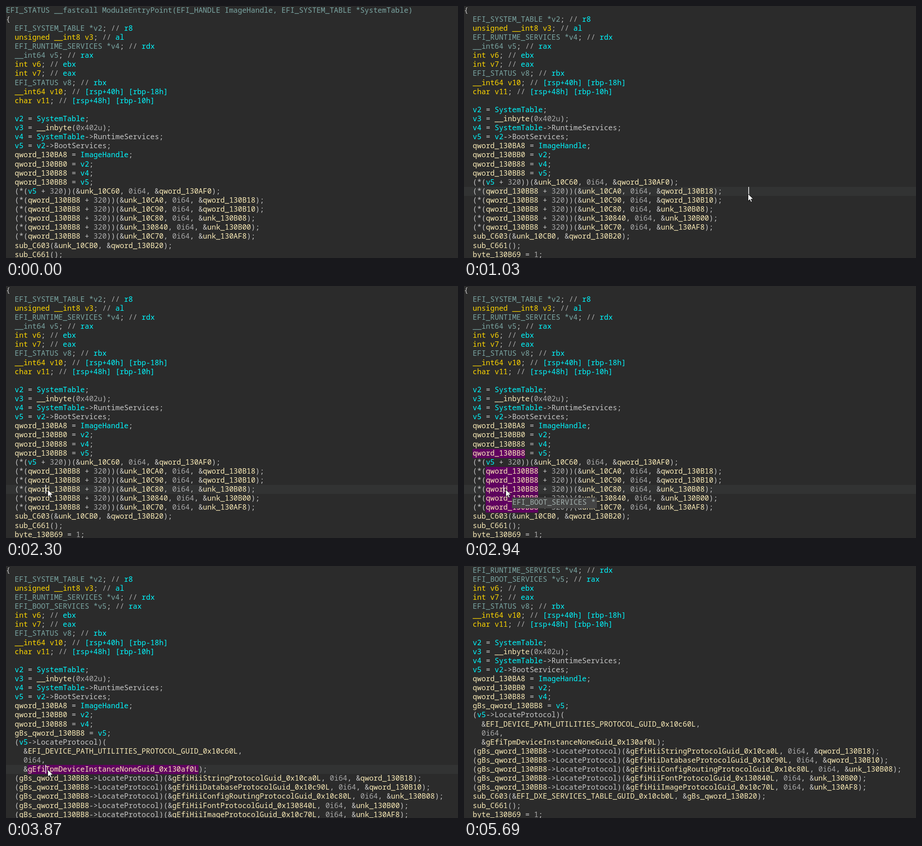
Animation, 1000 px wide and 560 px high, one loop 8.99 s. Source, as an HTML page with a canvas:

```html
<!DOCTYPE html>
<html>
<head>
<meta charset="utf-8">
<style>
html, body { margin: 0; width: 100%; height: 100%; overflow: hidden; background: #2b2b2b; }
canvas { display: block; }
</style>
</head>
<body>
<canvas id="stage" width="1000" height="560"></canvas>
<script>
const ctx = document.getElementById('stage').getContext('2d');
const LOOP = 8990, CW = 9.68, LH = 20.11, BASE = 14.7;
const FONT = '16.133px "Noto Sans Mono", "DejaVu Sans Mono", monospace';
const TYPE = '#7ba6a3', KEYWORD = '#ffd700', LOCAL = '#00f8ff', NAME = '#fbecb8',
      PUNCT = '#c6c6c6', DIM = '#a9a9a9';

const head = `EFI_STATUS __fastcall ModuleEntryPoint(EFI_HANDLE ImageHandle, EFI_SYSTEM_TABLE *SystemTable)
{
  EFI_SYSTEM_TABLE *v2; // r8
  unsigned __int8 v3; // al
  EFI_RUNTIME_SERVICES *v4; // rdx
  __int64 v5; // rax
  int v6; // ebx
  int v7; // eax
  EFI_STATUS v8; // rbx
  __int64 v10; // [rsp+40h] [rbp-18h]
  char v11; // [rsp+48h] [rbp-10h]

  v2 = SystemTable;
  v3 = __inbyte(0x402u);
  v4 = SystemTable->RuntimeServices;
  v5 = v2->BootServices;
  qword_130BA8 = ImageHandle;
  qword_130BB0 = v2;
  qword_130B88 = v4;
  qword_130BB8 = v5;
`;
const tail = `
  sub_C661();
  byte_130B69 = 1;`;

const call = (guid, out) => `  (*(qword_130BB8 + 320))(&${guid}, 0i64, &${out});`;
const namedCall = (guid, out) =>
  `  (gBs_qword_130BB8->LocateProtocol)(&gEfiHii${guid}L, 0i64, &${out});`;

const before = head + [
  '  (*(v5 + 320))(&unk_10C60, 0i64, &qword_130AF0);',
  call('unk_10CA0', 'qword_130B18'),
  call('unk_10C90', 'qword_130B10'),
  call('unk_10C80', 'unk_130B08'),
  call('unk_130840', 'unk_130B00'),
  call('unk_10C70', 'unk_130AF8'),
  '  sub_C603(&unk_10CB0, &qword_130B20);'
].join('\n') + tail;

const after = head
  .replace('__int64 v5', 'EFI_BOOT_SERVICES *v5')
  .replace('qword_130BB8', 'gBs_qword_130BB8') + [
  '  (v5->LocateProtocol)(',
  '    &EFI_DEVICE_PATH_UTILITIES_PROTOCOL_GUID_0x10c60L,',
  '    0i64,',
  '    &gEfiTpmDeviceInstanceNoneGuid_0x130af0L);',
  namedCall('StringProtocolGuid_0x10ca0', 'qword_130B18'),
  namedCall('DatabaseProtocolGuid_0x10c90', 'qword_130B10'),
  namedCall('ConfigRoutingProtocolGuid_0x10c80', 'unk_130B08'),
  namedCall('FontProtocolGuid_0x130840', 'unk_130B00'),
  namedCall('ImageProtocolGuid_0x10c70', 'unk_130AF8'),
  '  sub_C603(&EFI_DXE_SERVICES_TABLE_GUID_0x10cb0L, &gBs_qword_130B20);'
].join('\n') + tail;

function tokenColor(s) {
  if (/^(v\d+|SystemTable|ImageHandle)$/.test(s)) return LOCAL;
  if (/^\d/.test(s)) return DIM;
  if (/^\W|^(RuntimeServices|BootServices|LocateProtocol)$/.test(s)) return PUNCT;
  return NAME;
}

// Splits a line into [text, colour, column].
function tokenize(line, row) {
  const decl = line.match(/^(.*)(;)( \/\/ )(.*)$/);
  let parts;
  if (row === 0) parts = [[line, TYPE]];
  else if (decl) {
    const type = /EFI_|__int64 v5/.test(line) ? TYPE : KEYWORD;
    parts = [[decl[1], type], [decl[2], PUNCT], [decl[3], DIM], [decl[4], LOCAL]];
  } else parts = (line.match(/\w+|\W+/g) || []).map(s => [s, tokenColor(s)]);
  let col = 0;
  return parts.map(([s, color]) => {
    const token = [s, color, col];
    col += s.length;
    return token;
  });
}
const parse = code => code.split('\n').map(tokenize);
const plainCode = parse(before), namedCode = parse(after);

// Step tracks: each entry holds from its time until the next one.
const at = (track, t) => track.filter(k => k[0] <= t).pop().slice(1);
const scroll = [[0, 0], [70, 1], [5270, 4]];
const code = [[0, plainCode], [3380, namedCode]];
const word = [[0, ''], [2380, 'qword_130BB8'], [3380, 'gEfiTpmDeviceInstanceNoneGuid_0x130af0L'], [4570, '']];
const activeRow = [[0, -1], [770, 20], [2300, 22], [4570, -1]];
const caret = [[0, -1], [770, 65], [1730, -1], [2300, 9], [4110, -1]];
const pointer = [
  [0], [70, 420, 326], [220, 621, 434], [770, 628, 417],
  [1730, 700, 452], [1820, 804, 503], [1910], [2050, 537, 519], [2300, 92, 452],
  [4110, 120, 462], [4180, 165, 475], [4250, 202, 483],
  [4790, 300, 470], [4870, 430, 460], [4950, 570, 462],
  [5030, 690, 475], [5110, 780, 485], [5190, 793, 487], [5450]
];
const arrow = new Path2D('M.5 .5V16.5L4.2 13L6.8 18.7L9.4 17.6L6.9 12H12Z');

function box(x, y, w, h, color) {
  ctx.fillStyle = color;
  ctx.fillRect(x, y, w, h);
}
function text(s, x, y, color) {
  ctx.fillStyle = color;
  ctx.fillText(s, x, y);
}

function draw(t) {
  const [top] = at(scroll, t), [lines] = at(code, t), [marked] = at(word, t);
  const [active] = at(activeRow, t), [caretCol] = at(caret, t), [px, py] = at(pointer, t);
  box(0, 0, 1000, 560, '#2b2b2b');
  ctx.font = FONT;
  if (active >= 0) box(0, Math.round(active * LH), 1000, 20, '#323333');

  lines.slice(top, top + 28).forEach((tokens, i) => {
    const y = i * LH;
    for (const [s, color, col] of tokens) {
      if (s === marked) box(Math.round(col * CW), Math.round(y), Math.round(s.length * CW), 20.5, '#600060');
      text(s, col * CW, y + BASE, color);
    }
  });

  if (caretCol >= 0) box(Math.round(caretCol * CW), Math.round(active * LH), 1.5, 19, '#fff');
  if (t >= 2940 && t < 3220) {
    box(106, 470, 188, 24, '#444');
    text('EFI_BOOT_SERVICES *', 107, 486, '#a3b0ae');
  }
  if (px !== undefined) {
    ctx.save();
    ctx.translate(px, py);
    ctx.fillStyle = '#fff';
    ctx.strokeStyle = '#111';
    ctx.fill(arrow);
    ctx.stroke(arrow);
    ctx.restore();
  }
}

const start = performance.now();
function tick() {
  draw((performance.now() - start) % LOOP);
  requestAnimationFrame(tick);
}
tick();
</script>
</body>
</html>
```
